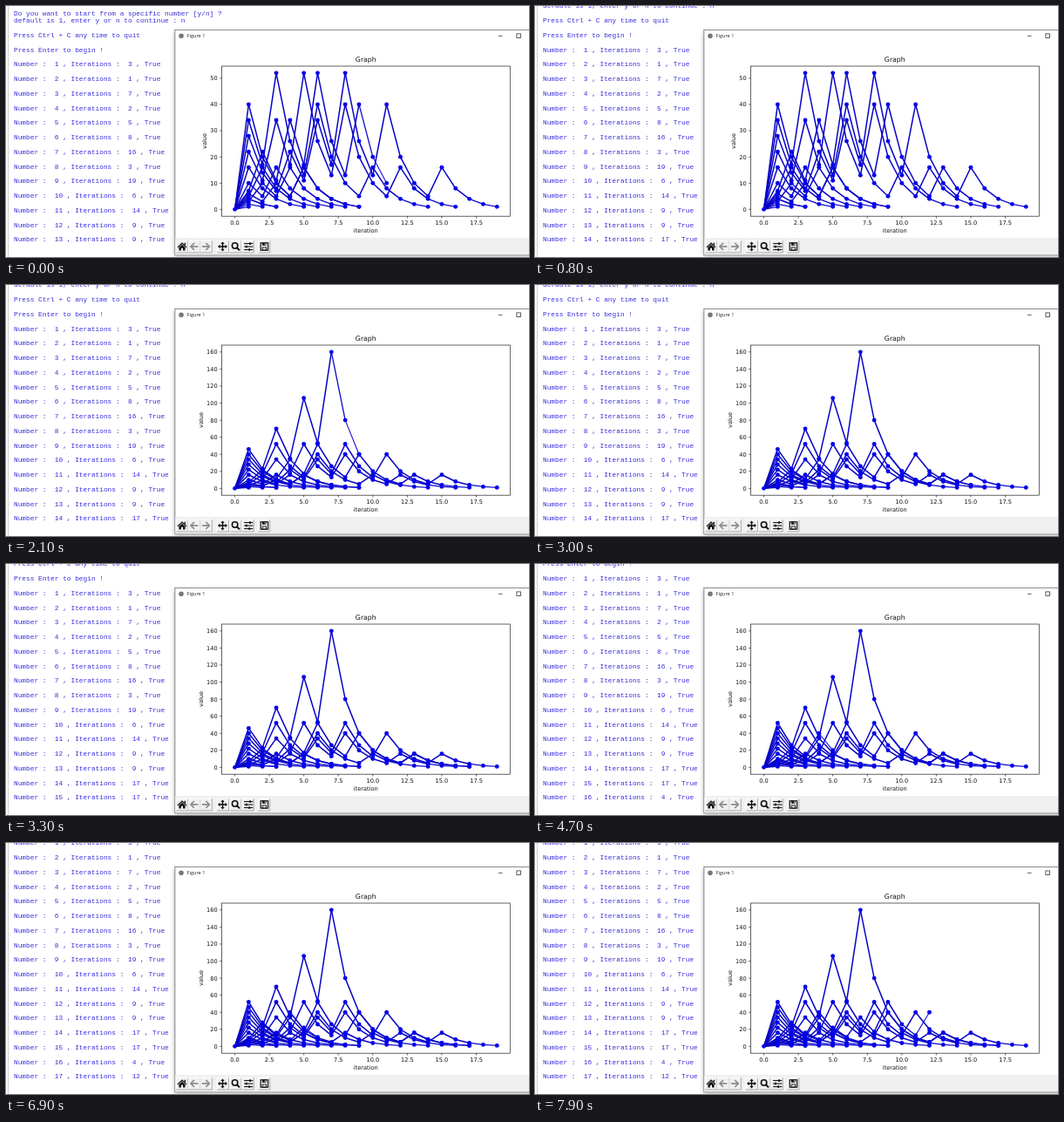
An HTML page with a canvas for the animation above (8 s loop, 600 by 288 pixels).

```html
<!DOCTYPE html>
<html lang="en">
<head>
<meta charset="utf-8">
<title>Collatz plot</title>
<style>
html, body { margin: 0; width: 600px; height: 288px; overflow: hidden; background: #fff; }
canvas { display: block; }
</style>
</head>
<body>
<canvas id="stage" width="600" height="288"></canvas>
<script>
const ctx = document.getElementById('stage').getContext('2d');
const LOOP = 8000;
const MONO = '7.81px "Liberation Mono", "Courier New", monospace';
const SANS = '"DejaVu Sans", sans-serif';
const AX = { l: 247.5, t: 69, r: 578.3, b: 241.2 };

// Values reached after each step, down to 1; number 1 runs one full cycle.
function collatz(n) {
  const out = [];
  do {
    n = n % 2 ? 3 * n + 1 : n / 2;
    out.push(n);
  } while (n !== 1);
  return out;
}

const runs = Array.from({ length: 20 }, (_, n) => n ? collatz(n) : []);

// Every redraw takes slightly longer than the one before.
const stepTime = s => 138.3 * s + 0.307 * s * s - 50;

function stepAt(t) {
  let s = 0;
  while (stepTime(s + 1) <= t) s++;
  return s;
}

function stateAt(step) {
  let n = 14, k = 11 + step;
  while (k > runs[n].length) k -= runs[n++].length;
  return { n, k, printed: k === runs[n].length ? n : n - 1 };
}

function text(str, x, y, font, color, align = 'left') {
  ctx.font = font;
  ctx.fillStyle = color;
  ctx.textAlign = align;
  ctx.fillText(str, x, y);
}

function line(pts, color, width) {
  ctx.strokeStyle = color;
  ctx.lineWidth = width;
  ctx.beginPath();
  pts.forEach(([x, y], i) => i ? ctx.lineTo(x, y) : ctx.moveTo(x, y));
  ctx.stroke();
}

function shape(pts, color) {
  ctx.fillStyle = color;
  ctx.beginPath();
  pts.forEach(([x, y]) => ctx.lineTo(x, y));
  ctx.fill();
}

function dot(x, y, r, color) {
  ctx.fillStyle = color;
  ctx.beginPath();
  ctx.arc(x, y, r, 0, 7);
  ctx.fill();
}

function rect(x, y, w, h, color) {
  ctx.fillStyle = color;
  ctx.fillRect(x, y, w, h);
}

function drawConsole(printed) {
  rect(0, 0, 600, 288, '#fff');
  rect(2, 0, 1, 288, '#cfcfcf');
  const pitch = 8.375;
  const lines = [
    'Do you want to start from a specific number [y/n] ?',
    'default is 1, enter y or n to continue : n', '',
    'Press Ctrl + C any time to quit', '',
    'Press Enter to begin !', ''
  ];
  for (let n = 1; n <= printed; n++) {
    lines.push(`Number :  ${n} , Iterations :  ${runs[n].length} , True`, '');
  }
  const last = lines.length - 2;
  lines.forEach((s, i) => text(s, 9, 270.4 + (i - last) * pitch, MONO, '#382cdc'));
}

function drawWindow() {
  ctx.save();
  ctx.shadowColor = 'rgba(0,0,0,.4)';
  ctx.shadowBlur = 5;
  ctx.shadowOffsetY = 1;
  rect(194, 27.5, 420, 258.5, '#fff');
  ctx.restore();
  rect(193.5, 27, 407, 0.8, '#777');
  rect(193.5, 27, 0.8, 259, '#777');
  rect(194.3, 266, 406, 19.6, '#f0f0f0');
  rect(193.5, 285.5, 407, 0.8, '#888');
  dot(201, 34.2, 2.8, '#777');
  text('Figure 1', 207.6, 36.2, '5.6px "Open Sans", sans-serif', '#222');
  line([[564.8, 34.3], [569.6, 34.3]], '#333', 0.8);
  ctx.strokeRect(585.9, 31.9, 4.6, 4.6);
}

function button(x) {
  const l = x - 6.6, r = x + 6.8, t = 269.3, b = 283;
  line([[l, b], [l, t], [r, t]], '#fff', 0.9);
  line([[l, b], [r, b], [r, t]], '#a4a4a4', 0.9);
}

function arrow(x, y, dir, color) {
  line([[x - dir * 4.3, y], [x + dir * 3.6, y]], color, 1.7);
  line([[x, y - 4], [x + dir * 4, y], [x, y + 4]], color, 1.7);
}

function drawToolbar() {
  const y = 276, ink = '#111';
  [202, 216, 229.6, 248.8, 263.2, 277.4, 296].forEach(button);
  // home
  shape([[196.6, 276.6], [202, 271.3], [207.4, 276.6], [206.6, 277.4], [202, 273], [197.4, 277.4]], ink);
  shape([[198.4, 277.2], [202, 273.8], [205.6, 277.2], [205.6, 280.6], [203, 280.6],
    [203, 277.8], [201, 277.8], [201, 280.6], [198.4, 280.6]], ink);
  rect(204.6, 271.8, 1.4, 2.6, ink);
  arrow(216, y, -1, '#8a8a8a');
  arrow(229.3, y, 1, '#8a8a8a');
  // pan
  line([[244.5, y], [252.5, y]], ink, 1.5);
  line([[248.5, y - 4], [248.5, y + 4]], ink, 1.5);
  for (const [dx, dy] of [[1, 0], [-1, 0], [0, 1], [0, -1]]) {
    const px = 248.5 + dx * 3, py = y + dy * 3;
    shape([[px + dx * 2.5, py + dy * 2.5], [px + dy * 2.2, py + dx * 2.2], [px - dy * 2.2, py - dx * 2.2]], ink);
  }
  // zoom
  ctx.strokeStyle = ink;
  ctx.lineWidth = 1.6;
  ctx.beginPath();
  ctx.arc(262.6, 275, 3.2, 0, 7);
  ctx.stroke();
  line([[264.8, 277.2], [268, 280.4]], ink, 2);
  // sliders
  [6.8, 2.6, 6].forEach((knob, i) => {
    const sy = 272.6 + i * 3.5;
    line([[273.1, sy], [283.3, sy]], ink, 1.1);
    rect(272.3 + knob, sy - 1.3, 1.8, 2.6, ink);
  });
  // save
  ctx.strokeStyle = ink;
  ctx.lineWidth = 1.2;
  ctx.strokeRect(292.2, 271.8, 8.4, 8.4);
  rect(294, 271.8, 4.6, 3, ink);
  rect(296.8, 272.4, 1, 1.8, '#f0f0f0');
  ctx.lineWidth = 0.9;
  ctx.strokeRect(294.2, 277, 4.4, 3.2);
}

function drawPlot(n, k) {
  const shown = runs.slice(0, n + 1).map((r, i) => i < n ? r : r.slice(0, k));
  const maxY = Math.max(...shown.flat());
  const maxX = Math.max(...shown.map(r => r.length));
  const ux = (AX.r - AX.l) / (maxX * 1.1), uy = (AX.b - AX.t) / (maxY * 1.1);
  const px = x => AX.l + (x + maxX * 0.05) * ux;
  const py = y => AX.b - (y + maxY * 0.05) * uy;
  const small = '6.6px ' + SANS;

  // Segments drawn again on later steps build up a heavier line.
  for (const run of shown) {
    let prev = 0;
    run.forEach((v, i) => {
      const again = Math.min(run.length - 1 - i, 2);
      line([[px(i), py(prev)], [px(i + 1), py(v)]],
        ['#1610d4', '#0e08cc', '#0804c6'][again], 1.1 + again * 0.2);
      prev = v;
    });
  }
  for (const run of shown) {
    run.forEach((v, i) => dot(px(i + 1), py(v), 2.45, '#0400e8'));
  }
  dot(px(0), py(0), 2.45, '#0400e8');

  ctx.strokeStyle = '#222';
  ctx.lineWidth = 0.7;
  ctx.strokeRect(AX.l, AX.t, AX.r - AX.l, AX.b - AX.t);
  for (let x = 0; x <= maxX * 1.05; x += 2.5) {
    line([[px(x), AX.b], [px(x), AX.b + 2.3]], '#222', 0.7);
    text(x.toFixed(1), px(x), 250.8, small, '#111', 'center');
  }
  const gap = maxY > 80 ? 20 : 10;
  let labelW = 0;
  for (let y = 0; y <= maxY * 1.05; y += gap) {
    line([[AX.l - 2.3, py(y)], [AX.l, py(y)]], '#222', 0.7);
    text(y, 242.6, py(y) + 2.4, small, '#111', 'right');
    labelW = Math.max(labelW, ctx.measureText(y).width);
  }
  text('Graph', 412.8, 64.4, '7.8px ' + SANS, '#111', 'center');
  text('iteration', 412.8, 259.7, small, '#111', 'center');
  // The axis title keeps clear of the widest tick label.
  ctx.save();
  ctx.translate(238.6 - labelW, 155);
  ctx.rotate(-Math.PI / 2);
  text('value', 0, 0, small, '#111', 'center');
  ctx.restore();
}

let drawn = -1;
function render(t) {
  const step = stepAt(t);
  if (step === drawn) return;
  drawn = step;
  const { n, k, printed } = stateAt(step);
  drawConsole(printed);
  drawWindow();
  drawPlot(n, k);
  drawToolbar();
}

const start = performance.now();
function tick() {
  render((performance.now() - start) % LOOP);
  requestAnimationFrame(tick);
}
tick();
</script>
</body>
</html>
```
